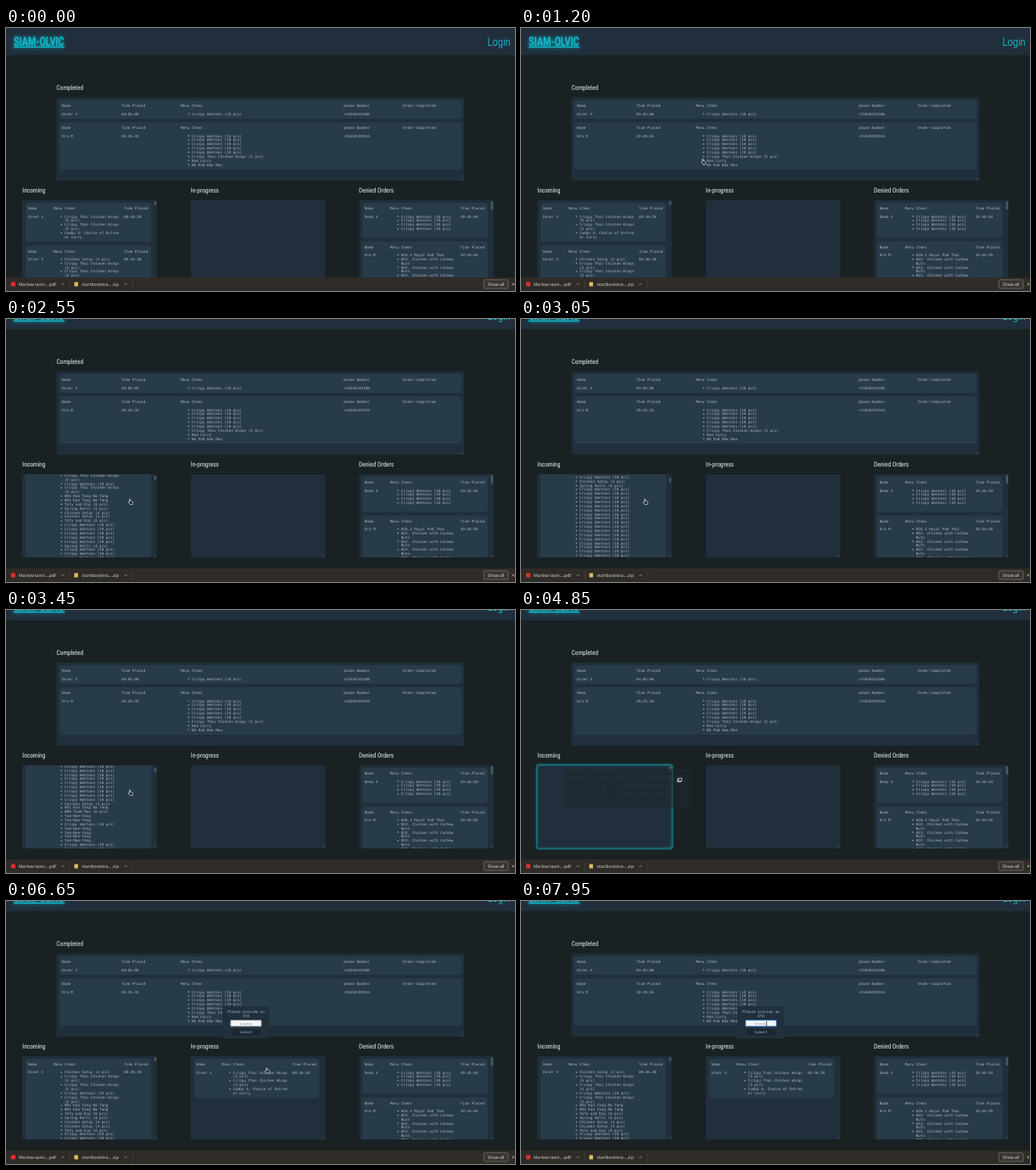
An HTML page that plays this animation: 600 by 310 pixels, repeating every 8 s.

```html
<!DOCTYPE html>
<html lang="en">
<head>
<meta charset="utf-8">
<title>Order board</title>
<style>
html, body { margin: 0; width: 100%; height: 100%; overflow: hidden; background: #1a2123; }
svg { display: block; width: 100vw; height: 100vh; }
text { text-rendering: geometricPrecision; }
.mono { font: 4.27px "DejaVu Sans Mono", monospace; fill: #aeb8bd; }
.head { font: 500 8px Roboto, sans-serif; fill: #c3ccd0; }
.login { font: 13.6px Roboto, sans-serif; fill: #0fb4c6; }
.brand { font: 700 15px Roboto, sans-serif; fill: #12bccd; }
.glow { filter: drop-shadow(0 0 2px #0bb5c8); }
.bar { font: 5.1px "Open Sans", sans-serif; fill: #e6e3e0; }
.panel { fill: #202f3b; }
.card { fill: #283b49; }
.dot { fill: #aeb8bd; }
.thumb { fill: #4a5962; }
.grip { stroke: #5d6a72; stroke-width: .5; fill: none; }
.ring { fill: none; stroke: #17838c; stroke-width: 1; filter: drop-shadow(0 0 1px #13a0aa); }
.ghost .card { fill: #1e2a32; opacity: .5; }
.ghost .mono, .ghost .dot { fill: #17232b; }
.mid { text-anchor: middle; }
</style>
</head>
<body>
<svg id="stage" viewBox="0 0 600 310" preserveAspectRatio="none"></svg>
<script>
const LOOP = 8000, STEP = 50, LINE = 4.86, GAP = 4;
const stage = document.getElementById("stage");

// ---- data ----
const rep = (n, s) => Array(n).fill(s);
const wontons = "Crispy Wontons (10 pcs)", wings = "Crispy Thai Chicken Wings (5 pcs)";
const satay = "Chicken Satay (4 pcs)", tofu = "Tofu and Dip (8 pcs)", rolls = "Spring Rolls (4 pcs)";
const kao = "#01 Kao Tang Na Tang", yum = "Yum-Nue-Yang", cashew = "#22. Chicken with Cashew Nuts";

const small = { name: "Diner V", time: "08:36:28", items: [wings, wings, "Combo A: Choice of Entree or Curry"] };
const big = { name: "Diner V", time: "08:36:38", items: [
  satay, wings, wings, wontons, wings, kao, kao, tofu, rolls, satay, satay, tofu,
  ...rep(5, wontons), rolls, ...rep(12, wontons), satay, kao, "#08 Toad Mun (6 pcs)",
  yum, yum, wontons, ...rep(4, yum), ...rep(9, wontons), satay, rolls, ...rep(40, wontons)] };
const done = [
  { name: "Diner V", time: "04:05:06", phone: "+15550142386", items: [wontons] },
  { name: "Ora M", time: "20:45:35", phone: "+15550197024",
    items: [...rep(5, wontons), wings, "Red Curry", "N5 Pad Kee Mao"] }];
done[1].items.splice(4, 1, wontons);
const denied = [
  { name: "Demo V", time: "20:45:04", items: rep(4, wontons), spare: 1 },
  { name: "Ora M", time: "20:54:05", items: ["#26.1 Royal Pad Thai", ...rep(6, cashew)] }];

const wide = { width: 474, wrap: 60, cols: [["Name", 3, "name"], ["Time Placed", 73, "time"],
  ["Menu Items", 143, "items"], ["phone Number", 335, "phone"], ["Order-Completed", 405]] };
const slim = { width: 148, wrap: 25, cols: [["Name", 3, "name"], ["Menu Items", 33, "items"],
  ["Time Placed", 116, "time"]] };

// ---- drawing helpers ----
const label = (x, y, s, cls = "mono") => `<text class="${cls}" x="${x}" y="${y}">${s}</text>`;
const narrow = (x, y, s, cls, k = .81) =>
  `<text class="${cls}" transform="translate(${x} ${y}) scale(${k} 1)">${s}</text>`;
const box = (x, y, w, h, cls, r = 0, more = "") =>
  `<rect class="${cls}" x="${x}" y="${y}" width="${w}" height="${h}" rx="${r}" ${more}/>`;
const group = (id, inner, more = "") => `<g id="${id}" ${more}>${inner}</g>`;

function wrapText(s, max) {
  const lines = [""];
  for (const word of s.split(" ")) {
    const last = lines[lines.length - 1];
    if (!last) lines[lines.length - 1] = word;
    else if (last.length + word.length < max) lines[lines.length - 1] = last + " " + word;
    else lines.push(word);
  }
  return lines;
}

const lineCount = (order, wrap) =>
  order.items.reduce((n, s) => n + wrapText(s, wrap).length, order.spare || 0);
const cardHeight = (order, look) => 22 + (lineCount(order, look.wrap) - 1) * LINE;

function card(x, y, order, look) {
  let out = box(x, y, look.width, cardHeight(order, look), "card", 3.5);
  for (const [title, dx, key] of look.cols) {
    out += label(x + dx, y + 8.4, title);
    if (key !== "items") { out += label(x + dx, y + 17.5, order[key] || ""); continue; }
    let row = y + 17.5;
    for (const item of order.items) {
      out += `<circle class="dot" cx="${x + dx + 9.3}" cy="${row - 1.4}" r=".75"/>`;
      for (const s of wrapText(item, look.wrap)) {
        out += label(x + dx + 13, row, s);
        row += LINE;
      }
    }
  }
  return out;
}

function stack(x, y, orders, look) {
  return orders.map(o => {
    const out = card(x, y, o, look);
    y += cardHeight(o, look) + GAP;
    return out;
  }).join("");
}

const panel = (x, y, w, h) => box(x, y, w, h, "panel", 1);
const grip = (x, y) => `<path class="grip" d="M${x - 3} ${y - .8}l2.2 -2.2M${x - 1.6} ${y - .8}l.8 -.8"/>`;
const clip = (id, x) => `<clipPath id="${id}"><rect x="${x}" y="203" width="158.5" height="98"/></clipPath>`;
const ring = (id, x) => group(id, box(x, 202.4, 159.7, 98.8, "ring", 2));

// ---- scene ----
const FIRST = cardHeight(small, slim) + GAP;

const page = `
  ${box(0, 0, 600, 32, "", 0, 'fill="#212f3c"')}
  <g class="glow">${narrow(9, 20.8, "SIAM-OLVIC", "brand", .71)}
    <rect x="9" y="21.8" width="60" height="1.3" fill="#12bccd"/></g>
  ${narrow(567.5, 20.9, "Login", "login")}
  ${narrow(59.5, 73, "Completed", "head")}
  ${panel(59.5, 82, 480.5, 98)}
  ${stack(63, 85, done, wide)}
  ${grip(540, 180)}
  ${narrow(19.3, 194.3, "Incoming", "head")}
  ${narrow(217.8, 194.3, "In-progress", "head")}
  ${narrow(416, 194.3, "Denied Orders", "head")}
  ${panel(19.2, 203, 158.5, 98)}${panel(217.8, 203, 158.5, 98)}${panel(416.2, 203, 158.5, 98)}
  <g clip-path="url(#inClip)">${group("incoming",
    group("firstCard", card(23, 206, small, slim)) + card(23, 206 + FIRST, big, slim))}</g>
  ${box(174.6, 204, 2.6, 4.5, "thumb", 1, 'id="thumb"')}
  ${group("moved", card(221.6, 206, small, slim))}
  <g clip-path="url(#denyClip)">${stack(419.8, 206, denied, slim)}</g>
  ${box(571.6, 204, 2.6, 10, "thumb", 1)}
  ${grip(177.7, 301)}${grip(376.3, 301)}${grip(574.7, 301)}
  ${ring("ringIn", 18.6)}${ring("ringProg", 217.2)}`;

const popup = `
  ${box(255, 124, 55.5, 38, "", 1, 'fill="#20303d"')}
  ${label(283, 132.4, "Please provide an", "mono mid")}
  ${label(283, 137.4, "ETA", "mono mid")}
  ${box(264.8, 140.6, 36.2, 7.2, "", .8, 'id="field" fill="#f4f6f7" stroke-width=".9"')}
  <text class="mono mid" x="283" y="145.7" style="font-size:3.4px;fill:#7d8488">minutes</text>
  <path id="caret" d="M283.2 142.2V147" stroke="#111" stroke-width=".5"/>
  ${box(266, 151, 34, 7, "", .8, 'fill="#192630"')}
  ${label(283, 156, "Submit", "mono mid")}`;

const chevron = x => `<path d="M${x - 1.5} 302.8l1.5 -1.5l1.5 1.5" fill="none" stroke="#cfcac5" stroke-width=".6"/>`;
const divider = x => `<path d="M${x} 297V307" stroke="#56514c" stroke-width=".5"/>`;
const downloads = `
  ${box(0, 294, 600, 16, "", 0, 'fill="#2f2c28"')}
  ${box(6, 299.4, 5, 5.2, "", .5, 'fill="#d8322c"')}
  ${label(15, 304, "Marlow tavin....pdf", "bar")}${chevron(67)}${divider(75)}
  ${box(80.5, 299.4, 4.4, 5.2, "", .5, 'fill="#e3bd55"')}
  ${label(89.5, 304, "startbootstra....zip", "bar")}${chevron(141)}${divider(149.3)}
  ${box(563.2, 296.8, 28.8, 10.2, "", 1.5, 'fill="#393531" stroke="#8b8681" stroke-width=".6"')}
  ${label(577.6, 303.8, "Show all", "bar mid")}
  <path d="M596.6 300.6l2.8 2.8m0 -2.8l-2.8 2.8" stroke="#d6d2ce" stroke-width=".6"/>`;

// Pointer shapes are centred on the origin.
const pointers = {
  arrow: `<path d="M-2 -3.5V2.6L-.6 1.4L.4 3.6L1.4 3.1L.4 1H2.4Z" fill="#15191b" stroke="#e8eaea" stroke-width=".5"/>`,
  hand: `<path d="M-1.5 -3.2Q-.8 -3.7 -.4 -3V-1L2 -.5Q2.7 -.2 2.6 .6L2.1 3H-.9L-2.7 .6Q-2.7 -.3 -1.5 .3Z"
    fill="#20282c" stroke="#dfe3dc" stroke-width=".7"/>`,
  copy: `<g fill="#20282c" stroke="#dfe3e3" stroke-width=".7"><rect x="-2.4" y="-1" width="3.6" height="3.2"/>
    <rect x="-1.2" y="-2.4" width="3.9" height="3.5"/></g>`,
  beam: `<path d="M-.9 -2.4H.9M0 -2.4V2.4M-.9 2.4H.9" stroke="#22282b" stroke-width=".6"/>`
};

stage.innerHTML = `<defs>${clip("inClip", 19.2)}${clip("denyClip", 416.2)}</defs>
  ${group("page", page)}
  ${group("popup", popup)}
  ${group("ghost", card(23, 186, small, slim), 'class="ghost"')}
  ${downloads}
  ${group("pointer", Object.keys(pointers).map(k => group(k, pointers[k])).join(""))}`;

// ---- motion ----
const pointerPath = [[500, 215, 316], [750, 199.5, 250], [950, 205, 193], [1100, 205, 193],
  [1250, 220.5, 140], [1900, 220.5, 140], [2200, 147, 215.5], [4200, 147, 215.5], [4550, 103, 199],
  [4750, 103, 199], [4850, 187, 200.5], [5050, 267, 207], [5200, 267, 207], [5450, 312, 211],
  [6550, 312, 211], [7150, 289.5, 144.7]];
const ghostPath = [[4750, 0, 0], [4850, 29.5, 1], [5050, 164, 8], [5200, 164, 8], [5450, 209, 11]];
const scrollBack = [[3000, 330], [3450, 184.6], [3650, 0]];

function along(path, t) {
  const i = path.findIndex(p => p[0] > t);
  if (i === 0) return path[0].slice(1);
  if (i < 0) return path[path.length - 1].slice(1);
  const a = path[i - 1], b = path[i], u = (t - a[0]) / (b[0] - a[0]);
  return a.slice(1).map((v, k) => v + (b[k + 1] - v) * u);
}

function listScroll(t) {
  const u = Math.min(1, Math.max(0, (t - 2300) / 500));
  return t < 3000 ? 330 * u * u : along(scrollBack, t)[0];
}

const el = id => document.getElementById(id);
const show = (id, on) => el(id).setAttribute("display", on ? "inline" : "none");
const move = (id, x, y) => el(id).setAttribute("transform", `translate(${x} ${y})`);

function pointerShape(t) {
  if (t < 1150) return "arrow";
  if (t >= 4800 && t < 5750) return "copy";
  return t < 7050 ? "hand" : "beam";
}

function draw(t) {
  const dragging = t >= 4800 && t < 5750, held = t >= 4800 && t < 5800, dropped = t >= 5800;
  const scroll = listScroll(t);

  move("page", 0, t < 1600 ? 0 : -20);
  move("incoming", 0, -scroll - (dropped ? FIRST : 0));
  move("thumb", 0, scroll * .012);
  show("incoming", !held);
  show("firstCard", !dropped);
  show("moved", dropped);
  show("ringIn", held && t < 4900);
  show("ringProg", held && t >= 4900);
  show("ghost", dragging);
  move("ghost", ...along(ghostPath, t));

  show("popup", dropped);
  el("field").setAttribute("stroke", t >= 7350 ? "#2f7fd6" : "#8d979d");
  show("caret", t >= 7350 && t < 7950);

  const shape = pointerShape(t);
  for (const k in pointers) show(k, k === shape);
  show("pointer", t >= 550);
  move("pointer", ...along(pointerPath, t));
}

function tick() {
  const t = performance.now() % LOOP;
  draw(Math.floor(t / STEP) * STEP);
  requestAnimationFrame(tick);
}
tick();
</script>
</body>
</html>
```
